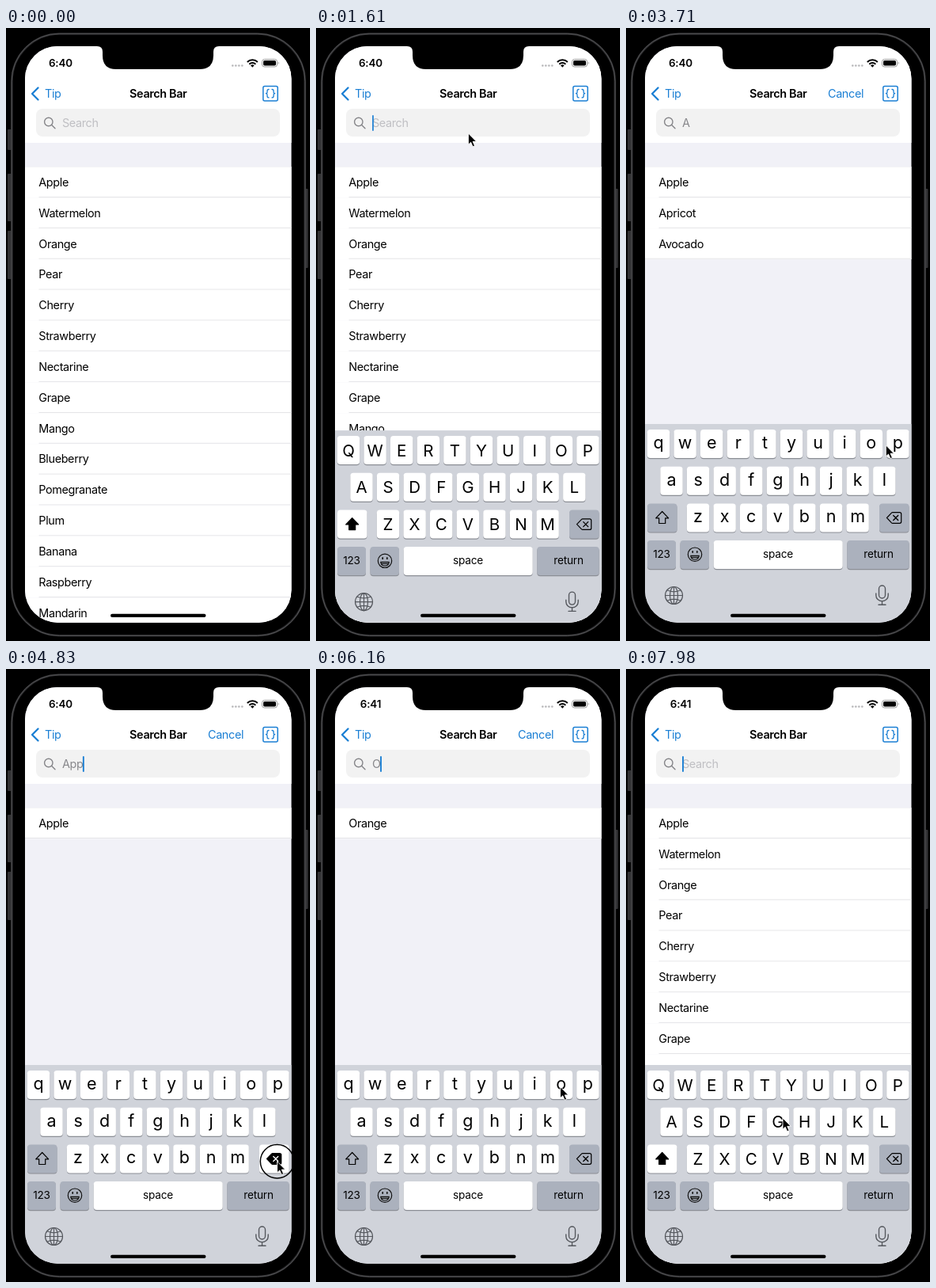
An HTML page that plays this animation: 384 px wide and 774 px high, repeating every 8000 ms.

```html
<!DOCTYPE html>
<html lang="en">
<head>
<meta charset="utf-8">
<title>Search Bar</title>
<style>
  html, body { margin: 0; width: 100%; height: 100%; overflow: hidden; background: #000; }
  svg { display: block; width: 100vw; height: 100vh; }
  text { font: 400 14.4px Inter, "Open Sans", sans-serif; letter-spacing: -.36px; white-space: pre; }
  .mid { text-anchor: middle; }
  .bold { font-weight: 600; }
  .blue { fill: #1b7fd4; }
  .line { fill: none; stroke-linecap: round; stroke-linejoin: round; }
  .key { fill: #fff; }
  .key.dark { fill: #abb1bd; }
  .shade { fill: #8b8e95; }
  .letter { font-size: 20.5px; letter-spacing: 0; }
  .small { font-size: 13.6px; letter-spacing: -.2px; }
</style>
</head>
<body>
<svg viewBox="0 0 384 774">
  <defs>
    <clipPath id="glass"><rect x="24" y="23" width="336.500" height="727.700" rx="41"/></clipPath>
  </defs>
  <rect width="384" height="774" fill="#000"/>

  <g fill="#333335">
    <rect x="2" y="128" width="5" height="26" rx="1"/>
    <rect x="2" y="184" width="5" height="60" rx="1"/>
    <rect x="2" y="256" width="5" height="61" rx="1"/>
    <rect x="377.500" y="203" width="4" height="100" rx="1"/>
  </g>
  <rect x="7.500" y="7.500" width="370" height="759.500" rx="60" fill="#000" stroke="#2a2a2c" stroke-width="2.500"/>
  <rect x="7" y="7" width="371" height="760.500" rx="60.500" fill="none" stroke="#555557"/>

  <g clip-path="url(#glass)">
    <rect x="24" y="23" width="338" height="730" fill="#f1f1f7"/>
    <rect x="24" y="23" width="338" height="122" fill="#fff"/>
    <g id="list"></g>

    <text id="clock" class="mid bold" x="69" y="49" style="font-size:13.4px;letter-spacing:-.1px"></text>
    <g id="dots" fill="#b8b8ba"></g>
    <g class="line" stroke="#000" stroke-width="2" style="stroke-linecap:butt">
      <path d="M304.800 43a9.200 9.200 0 0 1 13 0M307.300 45.800a5.600 5.600 0 0 1 8 0"/>
    </g>
    <path d="M311.300 49.800l-2.300-2.500a3.300 3.300 0 0 1 4.600 0z"/>
    <rect x="323.500" y="39.500" width="19" height="9.500" rx="3" fill="none" stroke="#9a9a9a"/>
    <rect x="325" y="41" width="16" height="6.500" rx="1.700"/>
    <path d="M343.800 42.500q2 1.700 0 3.500z" fill="#9a9a9a"/>

    <path class="line" d="M40.500 75.500L33 83l7.500 7.500" stroke="#1b7fd4" stroke-width="2.300"/>
    <text class="blue" x="49" y="88">Tip</text>
    <text class="mid bold" x="192.300" y="88">Search Bar</text>
    <text id="cancel" class="blue" x="255" y="88">Cancel</text>
    <g class="line" stroke="#1b7fd4" stroke-width="1.500">
      <rect x="324.800" y="73.500" width="18.400" height="18.400" rx="2"/>
      <path d="M332 77.500q-2 0-2 2v1.500q0 1.700-1.700 1.700q1.700 0 1.700 1.700v1.500q0 2 2 2M336 77.500q2 0 2 2v1.500q0 1.700 1.700 1.700q-1.700 0-1.700 1.700v1.500q0 2-2 2" stroke-width="1.300"/>
    </g>

    <rect x="38" y="102" width="308" height="35" rx="8" fill="#f2f2f2"/>
    <g class="line" stroke="#858589" stroke-width="1.400">
      <circle cx="53.800" cy="118.500" r="5.200"/><path d="M57.700 122.400l4.300 4.300"/>
    </g>
    <text id="query" x="71" y="125.300"></text>
    <rect id="caret" y="110" width="1.900" height="20" rx=".9" fill="#1b7fd4"/>

    <g id="keyboard">
      <rect x="24" y="500" width="338" height="254" fill="#d0d3da"/>
      <g id="keys"></g>
      <path id="arrow" class="line" d="M45.700 610.500l8 8.300h-4v6.700h-8v-6.700h-4z" stroke="#000" stroke-width="1.200"/>
      <path id="erase" d="M329.500 618.500l6-6.300q.5-.5 1.200-.5h9q2 0 2 2v9.600q0 2-2 2h-9q-.7 0-1.200-.5z" stroke="#000" stroke-width="1.200"/>
      <path id="cross" class="line" d="M337.700 615.500l6 6m0-6l-6 6" stroke-width="1.300"/>
      <text class="mid small" x="45" y="669">123</text>
      <text class="mid small" x="192" y="668.500">space</text>
      <text class="mid small" x="319" y="668.500">return</text>
      <g class="line" stroke="#111" stroke-width="1.200">
        <circle cx="87" cy="664.700" r="8.700"/>
        <path d="M81.700 666.300h10.600q-.8 4.700-5.300 4.700t-5.300-4.700zM82.300 668.300h9.400"/>
        <path d="M84.200 660.800v1.300M89.800 660.800v1.300" stroke-width="1.700"/>
      </g>
      <g class="line" stroke="#55585e" stroke-width="1.200">
        <circle cx="60.500" cy="716.500" r="11"/>
        <ellipse cx="60.500" cy="716.500" rx="5" ry="11"/>
        <path d="M60.500 705.500v22M49.500 716.500h22M52 709.800q8.500 4 17 0M52 723.200q8.500-4 17 0"/>
        <g stroke-width="1.400">
          <rect x="319.500" y="704" width="8" height="16" rx="4"/>
          <path d="M315.800 714v2.500a7.700 7.200 0 0 0 15.400 0V714M323.500 724v4.300M319 728.300h9"/>
        </g>
      </g>
    </g>
    <rect x="132" y="739.800" width="120.500" height="4.300" rx="2.150"/>
  </g>
  <path d="M115 22h154v1q-7 0-7 7v4.500q0 17.500-17 17.500H139q-17 0-17-17.500v-4.500q0-7-7-7z"/>

  <circle id="ring" fill="none" stroke="#000" stroke-width="1.500"/>
  <path id="pointer" d="M0 0v14.200l3.200-2.900 2.400 5.500 2.500-1.100-2.400-5.300h4.500z" stroke="#fff" stroke-width=".9"/>
</svg>

<script>
const LOOP = 8000, STEP = 70;
const $ = id => document.getElementById(id);
const set = (id, attrs) => { for (const k in attrs) $(id).setAttribute(k, attrs[k]); };

const fruits = ('Apple Watermelon Orange Pear Cherry Strawberry Nectarine Grape Mango Blueberry ' +
  'Pomegranate Plum Banana Raspberry Mandarin Apricot Avocado').split(' ');

const typing = [[0, ''], [2800, 'A'], [3990, 'Ap'], [4410, 'App'], [4900, 'Ap'],
  [5110, 'A'], [5320, ''], [6090, 'O'], [7490, '']];
const presses = [[910, 1050], [2590, 2730], [3850, 3990], [4270, 4410], [4830, 4900],
  [5040, 5110], [5250, 5320], [5950, 6090], [7350, 7490]];
// time, x, y of the pointer tip
const path = [[210, 128, 665], [910, 193.5, 120], [1540, 193.5, 120], [2240, 154, 583],
  [2520, 56, 573], [3030, 56, 573], [3800, 339, 525], [4430, 339, 525], [4790, 342.5, 621.7],
  [5350, 342.5, 621.7], [5900, 308.5, 527.5], [6440, 308.5, 527.5], [6510, 307.5, 527.5],
  [6600, 307.5, 527.5], [7340, 337, 620], [7530, 337, 620], [7980, 198, 567]];

function addKey(x, y, w, dark, id = '') {
  $('keys').insertAdjacentHTML('beforeend',
    `<rect class="shade" x="${x}" y="${y + 1}" width="${w}" height="36.2" rx="4"/>
     <rect id="${id}" class="key${dark ? ' dark' : ''}" x="${x}" y="${y}" width="${w}" height="36" rx="4"/>`);
}

function buildKeyboard() {
  [['QWERTYUIOP', 41], ['ASDFGHJKL', 57.5], ['ZXCVBNM', 91]].forEach(([row, x0], r) => {
    [...row].forEach((c, i) => {
      const x = x0 + i * 33.6, y = 507 + r * 46.7;
      addKey(x - 14.2, y, 28.4);
      $('keys').insertAdjacentHTML('beforeend',
        `<text class="mid letter" x="${x}" y="${y + 25.5}">${c}</text>`);
    });
  });
  addKey(27, 600.4, 37.5, true, 'shift');
  addKey(320, 600.4, 37.5, true, 'delete');
  addKey(27, 647, 36, true);
  addKey(68.5, 647, 36.5, true);
  addKey(110.7, 647, 163);
  addKey(279.3, 647, 78.3, true);
}

function showQuery(text) {
  const upper = text === '';
  const rows = fruits.filter(f => f.startsWith(text));
  $('list').innerHTML = '<path d="M24 175.500h338" stroke="#e6e6ea" stroke-width=".7"/>' + rows.map((name, i) => {
    const y = 175.5 + i * 38.85, left = i === rows.length - 1 ? 24 : 41.5;
    return `<rect x="24" y="${y}" width="338" height="38.85" fill="#fff"/>
      <path d="M${left} ${y + 38}H362" stroke="#dedee1" stroke-width=".8"/>
      <text x="41.3" y="${y + 24.3}">${name}</text>`;
  }).join('');
  $('query').textContent = text || 'Search';
  set('query', { fill: upper ? '#bfbfc3' : '#88888c' });
  set('cancel', { visibility: upper ? 'hidden' : 'visible' });
  document.querySelectorAll('.letter').forEach(el => {
    const c = el.textContent;
    el.textContent = upper ? c.toUpperCase() : c.toLowerCase();
    el.style.fontSize = upper ? '20.5px' : '21.5px';
    set('keys', { class: upper ? 'upper' : 'lower' });
    el.setAttribute('dy', upper ? 0 : -1.7);
  });
  $('shift').classList.toggle('dark', !upper);
  set('arrow', { style: `fill:${upper ? '#000' : 'none'}` });
  set('caret', { x: upper ? 71 : 70.4 + $('query').getComputedTextLength() });
}

function pointerAt(t) {
  const i = path.findIndex(p => p[0] > t);
  if (i < 0) return path[path.length - 1].slice(1);
  const [t0, x0, y0] = path[Math.max(i - 1, 0)], [t1, x1, y1] = path[i];
  const p = Math.max(0, (t - t0) / (t1 - t0)), e = p * p * (3 - 2 * p);
  return [x0 + (x1 - x0) * e, y0 + (y1 - y0) * e];
}

function caretOpacity(t, typedAt) {
  if (t < 1050) return 0;
  const phase = (t - (typedAt || (t < 1640 ? 1050 : 1640))) % 1000;
  if (phase < 550) return 1;
  if (phase < 650) return (650 - phase) / 100;
  return Math.max(0, (phase - 920) / 80);
}

let shown = null;
function render(t) {
  const [typedAt, text] = typing.filter(e => e[0] <= t).pop();
  if (text !== shown) showQuery(shown = text);
  $('clock').textContent = t < 5600 ? '6:40' : '6:41';
  set('caret', { opacity: caretOpacity(t, typedAt) });

  const drop = t < 1330 ? 260 : 251 * Math.exp((1260 - t) / 102);
  set('keyboard', { transform: `translate(0 ${drop < 1 ? 0 : drop})` });

  const [x, y] = pointerAt(t);
  set('pointer', { transform: `translate(${x} ${y})`, visibility: t < 210 ? 'hidden' : 'visible' });

  const down = presses.some(([a, b]) => t >= a && t < b);
  const fading = presses.some(([, b]) => t >= b && t < b + STEP);
  set('ring', { cx: x, cy: y, r: down ? 21.2 : 26, opacity: down ? 1 : fading ? .35 : 0 });

  const erasing = down && y > 600;
  $('delete').classList.toggle('dark', !erasing);
  set('erase', { fill: erasing ? '#000' : 'none' });
  set('cross', { stroke: erasing ? '#fff' : '#000' });
}

buildKeyboard();
$('dots').innerHTML = [0, 1, 2, 3].map(i => `<circle cx="${286.3 + i * 4}" cy="47.5" r="1.3"/>`).join('');

const start = performance.now();
function tick() {
  const t = (performance.now() - start) % LOOP;
  render(Math.floor(t / STEP) * STEP);
  requestAnimationFrame(tick);
}
tick();
</script>
</body>
</html>
```
